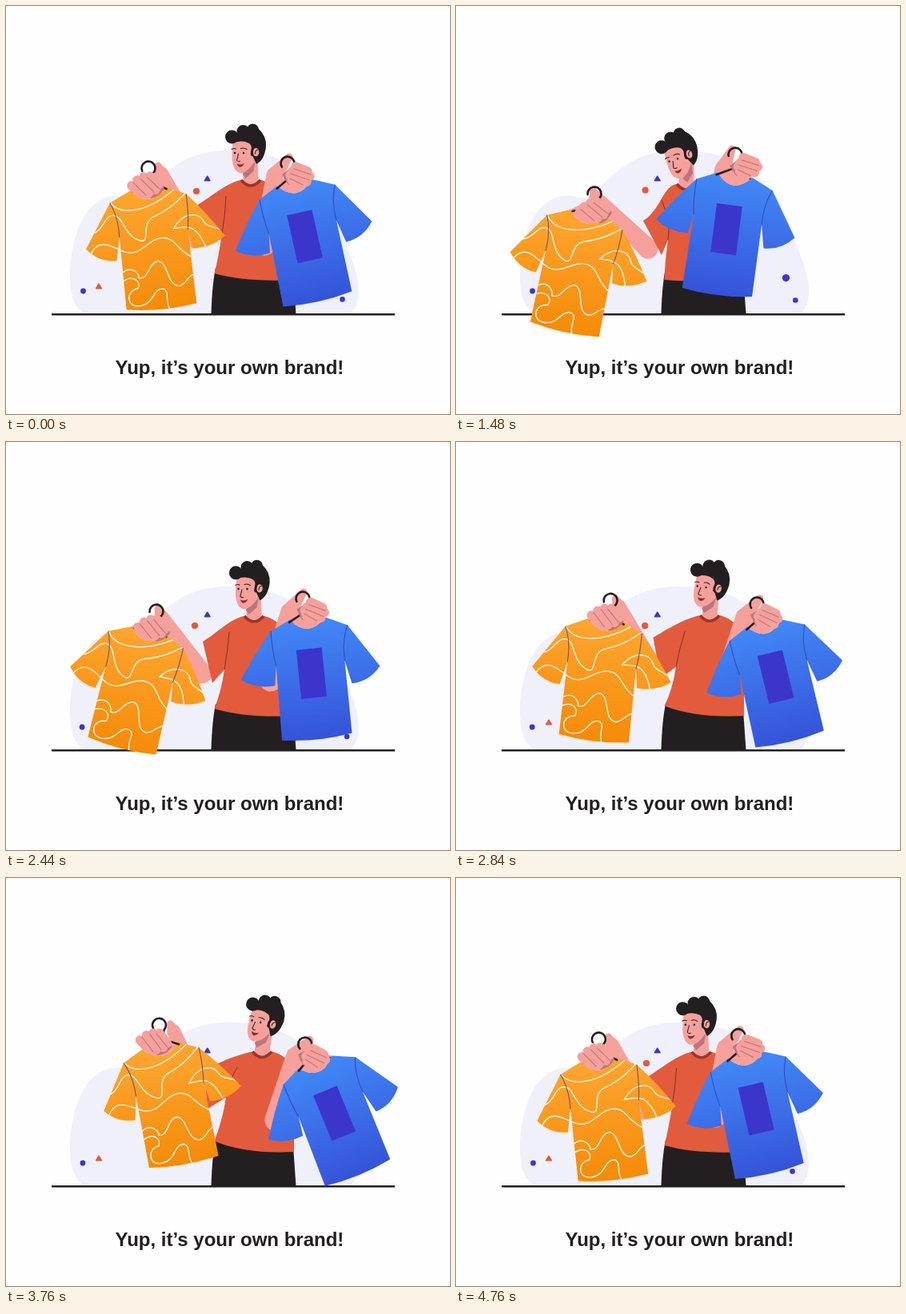
An HTML page that plays this animation: 555x511 px, repeating every 4800 ms.

```html
<!DOCTYPE html>
<html lang="en">
<head>
<meta charset="utf-8">
<title>Two shirts</title>
<style>
html, body { margin: 0; width: 100%; height: 100%; overflow: hidden; background: #fefefe; }
svg { display: block; width: 100%; height: 100%; }
text { font: bold 24px "Liberation Sans", Arial, sans-serif; fill: #231f20; }
.skin { fill: #f6a09c; }
.ink { fill: #231f20; }
.line { fill: none; stroke: #231f20; stroke-linecap: round; stroke-linejoin: round; }
.fold { fill: none; stroke: #b9777d; stroke-width: 1.1; stroke-linecap: round; }
.finger { fill: none; stroke: #f6a09c; stroke-width: 11.5; stroke-linecap: round; }
.wave { fill: none; stroke: #fff4e2; stroke-width: 1.4; stroke-linecap: round; }
</style>
</head>
<body>
<svg viewBox="0 0 555 511">
  <defs>
    <linearGradient id="gold" x1="0" y1="0" x2="0" y2="1">
      <stop offset="0" stop-color="#fea631"/><stop offset="1" stop-color="#f58b08"/>
    </linearGradient>
    <linearGradient id="blue" x1="0" y1="0" x2="0" y2="1">
      <stop offset="0" stop-color="#4289f7"/><stop offset="1" stop-color="#3553d8"/>
    </linearGradient>
    <path id="shirt" d="M-19 25L-44 36.5Q-67 62-87.500 93Q-70 107-46 105L-42 81L-44.500 174Q0 181 43.500 174L44 83L50 112Q72 112 87 94L52 39L25 26Q2 51.5-19 25Z"/>
    <path id="seams" d="M-44 36.5Q-45 62-42 81M52 39Q43 58 44 83" fill="none" stroke-width="1"/>
    <path id="collar" class="skin" d="M25 26Q2 51.5-19 25L-8 17H14Z"/>
    <path id="bar" class="line" stroke-width="2.600" d="M-20 28L-1 18L22 27.500"/>
    <path id="hook" class="line" stroke-width="2.600" d="M-8 3A8.500 8.500 0 1 1 5 7L1 18"/>
    <clipPath id="cut"><use href="#shirt" transform="scale(-1 1)"/></clipPath>
  </defs>

  <path fill="#f0f0fb" d="M98 385C82 376 80 356 80 332C82 282 102 238 139 237.500C153 238 160 244 170 237C192 218 214 181 280 180.500C330 181 366 198 392 228C412 252 421 288 431 314C440 338 448 368 431 385Z"/>
  <circle id="dotL" r="3.4" fill="#3b35cc"/>
  <circle id="dotO" r="4.1" fill="#e25a3c"/>
  <circle id="dotB" r="4.6" fill="#3b35cc"/>
  <circle id="dotR" r="3.3" fill="#3b35cc"/>
  <path d="M251.700 213.200L255 218.700H248.400Z" fill="#3b35cc" stroke="#3b35cc" stroke-width="1.500" stroke-linejoin="round"/>
  <path d="M116 348.200L119.300 353.700H112.700Z" fill="#e25a3c" stroke="#e25a3c" stroke-width="1.500" stroke-linejoin="round"/>

  <path class="ink" d="M262 328Q257.500 350 256.500 386H362.500L359 336Z"/>
  <path id="armL" class="skin"/>
  <path id="torso" fill="#e25b3d"/>
  <path id="seam" fill="none" stroke="#8a2f28" stroke-width="1"/>
  <path id="neck" class="skin"/>
  <g id="head">
    <path d="M4 27L20 12L18 24L8 33Z" fill="#b9777d"/>
    <path class="skin" d="M-8-22L-9 8Q-8 18-5 22Q-1 27 4 26Q13 23 19 12L21-22Z"/>
    <g class="ink" transform="translate(1.500 0)">
      <circle cx="-10.500" cy="-19" r="8.500"/>
      <circle cx="3.500" cy="-26" r="8"/>
      <circle cx="15.500" cy="-28" r="7.500"/>
      <path d="M-11-11Q2-16 11-11Q14-9 14-4L13 4L16 6L20 15Q30 10 32-7Q33-20 22-30L0-29Z"/>
    </g>
    <ellipse class="skin" cx="21" cy="0" rx="3.800" ry="5.200"/>
    <path class="line" stroke-width="1" d="M20 2Q20-3 23.500-3M-9.500-3.500Q-7-5-4-4M2-4.500Q6-6 9.500-3.500M-1 2L-3 10.500Q-1 12.500 1 11.500"/>
    <path class="line" stroke-width="2.800" d="M17.500-6Q15 0 16 3"/>
    <circle class="ink" cx="-5.500" cy="1" r="1.300"/>
    <circle class="ink" cx="5.500" cy="1" r="1.300"/>
    <path d="M-3 14.500Q2 16.500 6.500 14Q4 19.500 0 18.500Q-2 17.500-3 14.500Z" fill="#8f2b2c"/>
  </g>
  <path id="rib" fill="none" stroke="#9c352c" stroke-width="3.600"/>
  <path id="armR" class="skin"/>

  <path fill="none" stroke="#231f20" stroke-width="2.600" d="M57 386.200H486"/>

  <g id="shirtL">
    <use href="#shirt" transform="scale(-1 1)" fill="url(#gold)"/>
    <g clip-path="url(#cut)">
      <g class="wave" transform="rotate(2.600) translate(-196 -186)">
        <path d="M147 228C160 245 195 240 228 213"/>
        <path d="M122 265C136 262 138 243 149 243C163 244 160 271 184 277C194 276 183 254 200 247C220 239 232 228 243 217"/>
        <path d="M119 291C128 272 142 279 158 288C182 300 190 272 212 274C226 276 228 292 246 300"/>
        <path d="M264 290C252 256 240 262 224 263C236 243 256 243 262 256C266 264 276 262 288 270"/>
        <path d="M158 315C170 306 178 318 178 323C190 326 190 304 203 303C216 306 212 335 228 335C238 333 238 322 250 320"/>
        <path d="M158 326C172 318 180 328 176 336C160 338 160 360 178 358C196 356 194 336 208 338C216 342 208 352 215 364"/>
      </g>
    </g>
    <use href="#seams" transform="scale(-1 1)" stroke="#6b4a7d"/>
    <use href="#collar" transform="scale(-1 1)"/>
    <use href="#bar" transform="scale(-1 1)"/>
    <use href="#hook"/>
  </g>
  <g id="fistL">
    <path d="M3 38Q14 36 20 25L13 14L-4 26Z" fill="#b9777d"/>
    <path class="finger" d="M-21 22L-9 32M-14 15L1 31M-6 11L9 27M2 10L13 21"/>
    <path class="fold" d="M-19 18L-3 34M-10 13L7 30M-2 11L14 26"/>
  </g>

  <g id="shirtR">
    <use href="#shirt" fill="url(#blue)"/>
    <rect x="-15" y="63.500" width="32" height="61.500" fill="#3b35cc"/>
    <use href="#seams" stroke="#2f49bd"/>
    <use href="#collar"/>
    <use href="#bar"/>
    <use href="#hook"/>
  </g>
  <g id="fistR">
    <path d="M-7 14L4 6L8 22L1 27Q-3 22-7 14Z" fill="#b9777d"/>
    <path class="finger" d="M10 4L25 10M6 10L28 16M3 15L24 23M5 21L14 26"/>
    <path class="fold" d="M8 7L29 14M4 13L27 21M3 19L19 27"/>
  </g>

  <text x="136.500" y="461">Yup, it’s your own brand!</text>
</svg>
<script>
const LOOP = 4800;
const TIMES = [0, 840, 1480, 2440, 3280, 4200];

// Each track holds one value per key time.
const left = {
  x: [178, 171, 173, 188, 196, 185], y: [203, 228, 235, 212, 186, 189],
  swing: [-5.3, 5.3, 12.5, 14.5, -2.6, -12.6], fist: [0, -4, -5, 6, 9, 6],
  tipX: [190, 174, 171, 190, 207, 200], tipY: [200, 225, 231, 209, 185, 187],
  elbowX: [237, 240, 240, 245, 246, 240], elbowY: [291, 298, 304, 290, 278, 272]
};
const right = {
  x: [352, 345, 349, 371, 378, 366], y: [197, 187, 186, 196, 209, 204],
  swing: [-12.6, 2, 7.3, -6, -20.9, -20.1], fist: [0, -3, -1, 3, 7, 5],
  tipX: [354, 342, 345, 372, 384, 371], tipY: [189, 180, 179, 188, 203, 198],
  wristX: [336, 330, 334, 354, 364, 353], wristY: [212, 205, 204, 212, 224, 218],
  elbowX: [323, 318, 320, 331, 341, 332], elbowY: [298, 285, 286, 298, 305, 300]
};
const body = {
  headX: [291.5, 274, 271.5, 296, 316, 305], headY: [183, 190, 192, 183, 178.5, 180],
  tilt: [0, -12, -18, 1, 15, 8],
  neckX: [306, 291, 288, 310, 322, 315], neckY: [218, 221, 223, 218, 217, 218],
  cuffX: [238, 233, 234, 246, 246, 248], cuffY: [250, 262, 269, 250, 242, 244],
  tuckX: [250, 251, 257, 258, 253, 251], tuckY: [291, 310, 312, 302, 291, 290],
  pitX: [270, 266, 265, 273, 276, 273], pitY: [285, 283, 293, 285, 278, 275],
  hem: [335, 342, 343, 334, 328, 332]
};

const $ = id => document.getElementById(id);
const setPath = (id, d) => $(id).setAttribute("d", d);
const place = (id, x, y, a) =>
  $(id).setAttribute("transform", `translate(${x} ${y}) rotate(${a})`);
const moveDot = (id, x, y) => {
  $(id).setAttribute("cx", x);
  $(id).setAttribute("cy", y);
};

// Periodic cubic curve through the key values.
function sample(track, t) {
  const n = TIMES.length;
  const time = i => TIMES[(i + n) % n] + LOOP * Math.floor(i / n);
  const value = i => track[(i + n) % n];
  const slope = i => (value(i + 1) - value(i)) / (time(i + 1) - time(i));
  const tangent = i => {
    const a = time(i) - time(i - 1), b = time(i + 1) - time(i);
    return (slope(i - 1) * b + slope(i) * a) / (a + b);
  };
  let i = n - 1;
  while (TIMES[i] > t) i--;
  const h = time(i + 1) - time(i), u = (t - time(i)) / h, v = 1 - u;
  return value(i) * (1 + 2 * u) * v * v + tangent(i) * h * u * v * v
    + value(i + 1) * u * u * (3 - 2 * u) - tangent(i + 1) * h * u * u * v;
}

function pose(tracks, t) {
  const p = {};
  for (const k in tracks) p[k] = sample(tracks[k], t);
  return p;
}

// Tapered capsule between two circles.
function limb(x1, y1, r1, x2, y2, r2) {
  const a = Math.atan2(y2 - y1, x2 - x1), nx = -Math.sin(a), ny = Math.cos(a);
  const at = (x, y, r) => `${x + nx * r} ${y + ny * r}`;
  return `M${at(x1, y1, r1)}L${at(x2, y2, r2)}A${r2} ${r2} 0 0 0 ${at(x2, y2, -r2)}`
    + `L${at(x1, y1, -r1)}A${r1} ${r1} 0 0 0 ${at(x1, y1, r1)}Z`;
}

function drawSide(side, p, wx, wy, r) {
  place("shirt" + side, p.x, p.y, p.swing);
  place("fist" + side, p.x, p.y, p.fist);
  setPath("arm" + side, limb(p.tipX, p.tipY, 4.5, wx, wy, r)
    + limb(wx, wy, r, p.elbowX, p.elbowY, r + 4));
}

function drawBody(b) {
  const { neckX: x, neckY: y, cuffX, cuffY, pitX, pitY, hem } = b;
  setPath("torso", `M${x - 13} ${y}C${x - 30} ${y + 4} ${cuffX + 22} ${cuffY - 14} ${cuffX} ${cuffY}`
    + `L${b.tuckX} ${b.tuckY}L${pitX} ${pitY}Q${pitX - 4} ${pitY + 28} 260.5 ${hem}`
    + `Q300 346 360 343V260L${Math.min(x + 40, 360)} ${y + 22}`
    + `Q${x + 30} ${y + 4} ${x + 13} ${y}Z`);
  setPath("seam", `M${x - 31} ${y + 20}Q${pitX + 4} ${pitY - 22} ${pitX} ${pitY}`);
  setPath("rib", `M${x - 12} ${y}Q${x} ${y + 14} ${x + 12} ${y}`);

  place("head", b.headX, b.headY, b.tilt);
  const a = b.tilt * Math.PI / 180, c = Math.cos(a), s = Math.sin(a);
  setPath("neck", limb(b.headX + 14 * c - 12 * s, b.headY + 14 * s + 12 * c, 9, x, y - 1, 9.5));
}

function drawDots(t) {
  const w = Math.cos(2 * Math.PI * t / LOOP);
  moveDot("dotL", 95.8 + 0.7 * w, 357);
  moveDot("dotO", 237 + w, 231 + w);
  moveDot("dotB", 411.8 - 1.8 * w, 341.2 + 1.8 * w);
  moveDot("dotR", 423.3 - 2.8 * w, 368.2 - 0.8 * w);
}

function draw(t) {
  const l = pose(left, t), r = pose(right, t);
  drawDots(t);
  drawBody(pose(body, t));
  drawSide("L", l, l.tipX + 4, l.tipY + 9, 8.5);
  drawSide("R", r, r.wristX, r.wristY, 10.5);
}

function tick() {
  draw(performance.now() % LOOP);
  requestAnimationFrame(tick);
}
tick();
</script>
</body>
</html>
```
